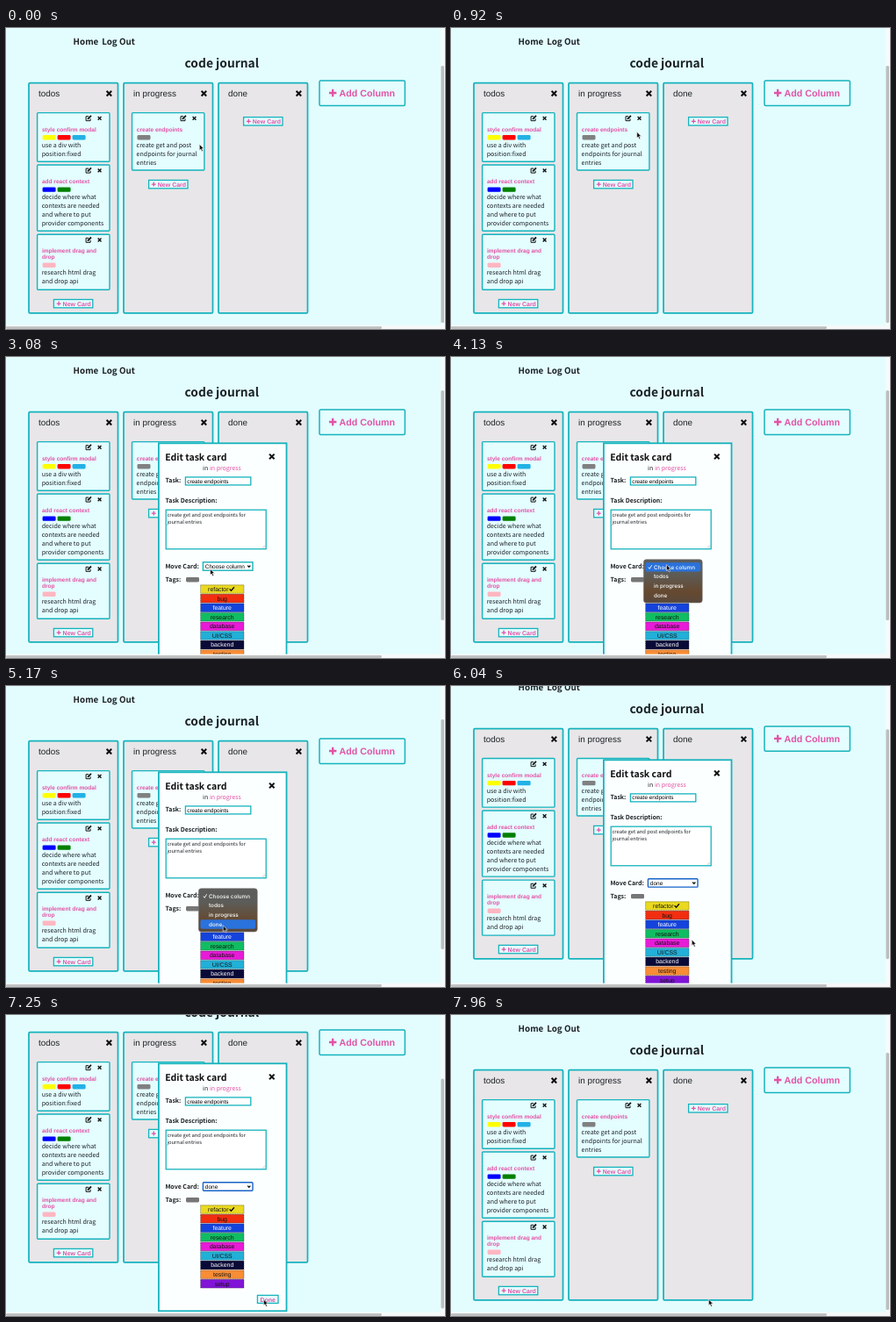
Write an HTML page that moves like this. It is 500x343 px and loops after 8 s.

```html
<!DOCTYPE html>
<html lang="en">
<head>
<meta charset="utf-8">
<title>code journal</title>
<style>
html, body { margin: 0; width: 100%; height: 100%; overflow: hidden; background: #e3fdff; }
svg { display: block; width: 100vw; height: 100vh; }
text { white-space: pre; text-rendering: geometricPrecision; }
.s { font-family: "Noto Sans CJK JP", "Noto Sans CJK SC", "Noto Sans CJK", "Noto Sans", sans-serif; }
.a { font-family: "Liberation Sans", Arial, sans-serif; }
.i { font-family: Inter, sans-serif; font-weight: 500; }
.b { font-weight: 700; }
</style>
</head>
<body>
<svg id="stage" viewBox="0 0 500 343" preserveAspectRatio="none"></svg>
<script>
const TEAL = '#16b3bd', PINK = '#e352a5', INK = '#1c2226', PAPER = '#e4fdff';
const LOOP = 8000, OPEN = 2080, DROP = 3640, PICK = 5420, CLOSE = 7330, SCROLL = 43;

const text = (x, y, str, size, cls = 's', fill = INK, anchor = 'start') =>
  `<text x="${x}" y="${y}" class="${cls}" font-size="${size}" fill="${fill}" text-anchor="${anchor}">${str}</text>`;
const rect = (x, y, w, h, fill, extra = '') =>
  `<rect x="${x}" y="${y}" width="${w}" height="${h}" fill="${fill}" ${extra}/>`;
const box = (x, y, w, h, fill, line = 1.4, r = 1) =>
  rect(x, y, w, h, fill, `stroke="${TEAL}" stroke-width="${line}" rx="${r}"`);
const path = (d, color, w) => `<path d="${d}" fill="none" stroke="${color}" stroke-width="${w}"/>`;
const cross = (x, y, r, w) =>
  path(`M${x - r} ${y - r}l${2 * r} ${2 * r}m0 ${-2 * r}l${-2 * r} ${2 * r}`, '#111', w);
const plus = (x, y, r, w) => path(`M${x - r} ${y}h${2 * r}M${x} ${y - r}v${2 * r}`, PINK, w);
const pencil = (x, y) =>
  path(`M${x} ${y - 2.2}h-3v5h5v-2.4`, '#111', 1) + path(`M${x - 1.1} ${y + 1}l4-4`, '#111', 1.8);
const chip = (x, y, color) => rect(x, y, 15, 5.4, color, 'rx="1.4"');
const button = (x, y, w, label) => box(x, y, w, 9.4, PAPER, 1.3, 0) +
  plus(x + 5.7, y + 4.7, 2.5, 1.3) + text(x + 10.2, y + 7.2, label, 7, 'a b', PINK);

function column(x, title) {
  return box(x, 62.7, 101.5, 262.2, '#e8e6e8', 1.75, 1.3) + text(x + 11, 77.6, title, 9.9, 'a') +
    cross(x + 91.4, 74.6, 2.8, 2.1);
}

function card(x, y, h, title, chips, lines) {
  const ty = y + 21, cy = ty + 4.4 + (title.length - 1) * 7;
  return box(x, y, 82.4, h, PAPER) + pencil(x + 58.5, y + 6.3) + cross(x + 71, y + 6.3, 1.9, 1.4) +
    title.map((t, i) => text(x + 5.3, ty + i * 7, t, 6.56, 'a b', PINK)).join('') +
    chips.map((c, i) => chip(x + 6 + i * 17, cy, c)).join('') +
    lines.map((t, i) => text(x + 5.1, cy + 13.7 + i * 10, t, 7.05)).join('');
}

const page = text(76.6, 18.8, 'Home', 9.8, 's b') + text(109.2, 18.8, 'Log Out', 9.8, 's b') +
  text(245.8, 44.6, 'code journal', 13.8, 's b', INK, 'middle') +
  column(26, 'todos') + column(134, 'in progress') + column(242, 'done') +
  card(35.6, 96.6, 55.6, ['style confirm modal'], ['#ffff00', '#ff0000', '#22b1e6'], ['use a div with', 'position:fixed']) +
  card(35.6, 156, 75.2, ['add react context'], ['#0000ff', '#008000'],
    ['decide where what', 'contexts are needed', 'and where to put', 'provider components']) +
  card(35.6, 235.2, 63, ['implement drag and', 'drop'], ['#ffb6c1'], ['research html drag', 'and drop api']) +
  card(143.5, 96.6, 65.4, ['create endpoints'], ['#808080'], ['create get and post', 'endpoints for journal', 'entries']) +
  button(54.4, 309.4, 44.4, 'New Card') + button(162.6, 173.4, 44.4, 'New Card') +
  button(270.6, 101.6, 44.4, 'New Card') +
  box(357, 60, 97.4, 28.4, PAPER, 1.5, 1.5) + plus(372.2, 74, 4.2, 2.3) +
  text(379.6, 77.7, 'Add Column', 10.7, 'a b', PINK);

const tags = [
  ['refactor', '#ead91f'], ['bug', '#f22e10'], ['feature', '#1443dc', '#fff'], ['research', '#10bd62'],
  ['database', '#e81bd8'], ['UI/CSS', '#22b0d8'], ['backend', '#0a0a38', '#fff'],
  ['testing', '#f98d35'], ['setup', '#8114d6']
];
const tagList = tags.map(([name, color, ink = '#111'], i) => {
  const y = 259.6 + i * 10.58;
  return rect(221.6, y, 49.4, 9.9, color) +
    rect(221.6, y + .3, 49.4, 9.4, 'none', 'stroke="#333" stroke-width=".6" stroke-dasharray="1 1"') +
    text(i ? 246.2 : 241.8, y + 7.4, name, 6.9, 'a', ink, 'middle');
}).join('') + path('M254.6 264.4l1.9 1.9 3.4-4', '#111', 1.4);

const modal = box(173.9, 98.3, 145.6, 282, '#fcffff', 1.8, 0) +
  text(181.2, 117.6, 'Edit task card', 10.5, 's b', '#111') + cross(302.8, 113.4, 2.8, 2) +
  `<text x="246" y="129.4" class="s" font-size="7" text-anchor="middle" fill="${INK}">in <tspan fill="${PINK}">in progress</tspan></text>` +
  text(181.4, 143.4, 'Task:', 7, 's b') + box(204.4, 136.9, 74.4, 9, '#fff', 1.3, 0) +
  text(206.2, 143.5, 'create endpoints', 6.4, 'a', '#000') +
  text(181.4, 166.4, 'Task Description:', 7, 's b') + box(182.2, 174.2, 114, 44.6, '#fff', 1.3, 0) +
  text(183.4, 182, 'create get and post endpoints for', 5.83) + text(183.4, 190.2, 'journal entries', 5.83) +
  path('M292 217.6l3-3m-1.2 3l1.2-1.2', '#999', .5) +
  text(181.4, 240.8, 'Move Card:', 7, 's b') + text(181.4, 256.4, 'Tags:', 7, 's b') +
  chip(205, 251, '#767676') +
  '<g id="choice"></g>' + tagList +
  box(286.4, 362.4, 23.6, 9, PAPER, 1.3, 0) + text(298.2, 369.6, 'Done', 7, 'a b', PINK, 'middle');

const options = ['Choose column', 'todos', 'in progress', 'done'];
const rowY = i => 234.2 + i * 10.7;
const menu = '<linearGradient id="glass" x2="0" y2="1"><stop offset=".3" stop-color="#5c5d5a"/>' +
  '<stop offset=".75" stop-color="#66492f"/><stop offset="1" stop-color="#58483c"/></linearGradient>' +
  rect(219.4, 230.8, 66.8, 49.2, 'url(#glass)', 'rx="3" stroke="#75706d" stroke-width=".6"') +
  '<rect id="hover" x="221.4" width="62.8" height="10.4" rx="2" fill="#2a72dc"/>' +
  options.map((o, i) => text(231, rowY(i) + 7.5, o, 6.3, 'i', '#fff')).join('') +
  path('M224.8 239.6l1.4 1.7 2.4-4', '#fff', .9);

const stage = document.getElementById('stage');
stage.innerHTML = rect(0, 0, 500, 343, '#e3fdff') +
  `<g id="page">${page}<g id="modal">${modal}</g></g><g id="menu">${menu}</g>` +
  rect(495, 0, 5, 343, '#f6fafa') + rect(0, 338.6, 500, 4.4, '#f6f9f9') +
  rect(0, 339.9, 428, 3.1, '#c0c2c2', 'rx="1.4"') +
  '<rect id="thumb" x="495.4" width="3.6" rx="1.6" fill="#bcbfc0"/>' +
  '<path id="cursor" d="M0 0v7l1.6-1.4 1.2 2.7 1.3-.6-1.2-2.6h2.2z" fill="#111" stroke="#fff" stroke-width=".6"/>';
const el = id => document.getElementById(id);

// time, x, y of the pointer
const route = [
  [0, 220.3, 132.4], [450, 220.3, 132.4], [1450, 201.4, 101.6], [2250, 201.4, 101.6],
  [2950, 232.5, 241.4], [3200, 232.5, 241.4], [3580, 245.4, 236.6], [4250, 245.4, 236.6],
  [5000, 247.2, 272.8], [5520, 247.2, 272.8], [6000, 274.2, 289], [6550, 274.2, 289],
  [7100, 293.4, 324], [LOOP, 293.4, 324]
];
const ease = u => u * u * (3 - 2 * u);
const ramp = (t, a, b) => ease(Math.min(1, Math.max(0, (t - a) / (b - a))));

function pointer(t) {
  const i = route.findIndex(p => p[0] > t);
  const [a, ax, ay] = route[i - 1], [b, bx, by] = route[i];
  const u = ramp(t, a, b);
  return [ax + (bx - ax) * u, ay + (by - ay) * u];
}

const show = (id, on) => el(id).setAttribute('display', on ? 'inline' : 'none');
let shown = null;

function select(done) {
  if (shown === done) return;
  shown = done;
  el('choice').innerHTML =
    rect(224.4, 233.8, 56.6, 9.4, '#fff', `stroke="${done ? '#1763c9' : TEAL}" stroke-width="1.4" rx="${done ? 1 : 0}"`) +
    text(226.8, 240.8, done ? 'done' : 'Choose column', 6.5, 'a', '#000') +
    path('M275.2 237.6l1.6 1.7 1.6-1.7', '#111', 1.3);
}

function draw(t) {
  const open = t >= OPEN && t < CLOSE;
  const scroll = open ? SCROLL * ramp(t, 5850, 6350) : 0;
  const [x, y] = pointer(t);
  el('page').setAttribute('transform', `translate(0 ${-scroll})`);
  show('modal', open);
  show('menu', t >= DROP && t < PICK);
  select(t >= PICK);
  const row = Math.min(3, Math.max(0, Math.floor((y - rowY(0)) / 10.7)));
  el('hover').setAttribute('y', rowY(row));
  el('thumb').setAttribute('y', open ? 38 + scroll * .8 : 43);
  el('thumb').setAttribute('height', open ? 262 : 293);
  el('cursor').setAttribute('transform', `translate(${x} ${y})`);
}

function tick(now) {
  draw(now % LOOP);
  requestAnimationFrame(tick);
}
draw(0);
requestAnimationFrame(tick);
</script>
</body>
</html>
```
